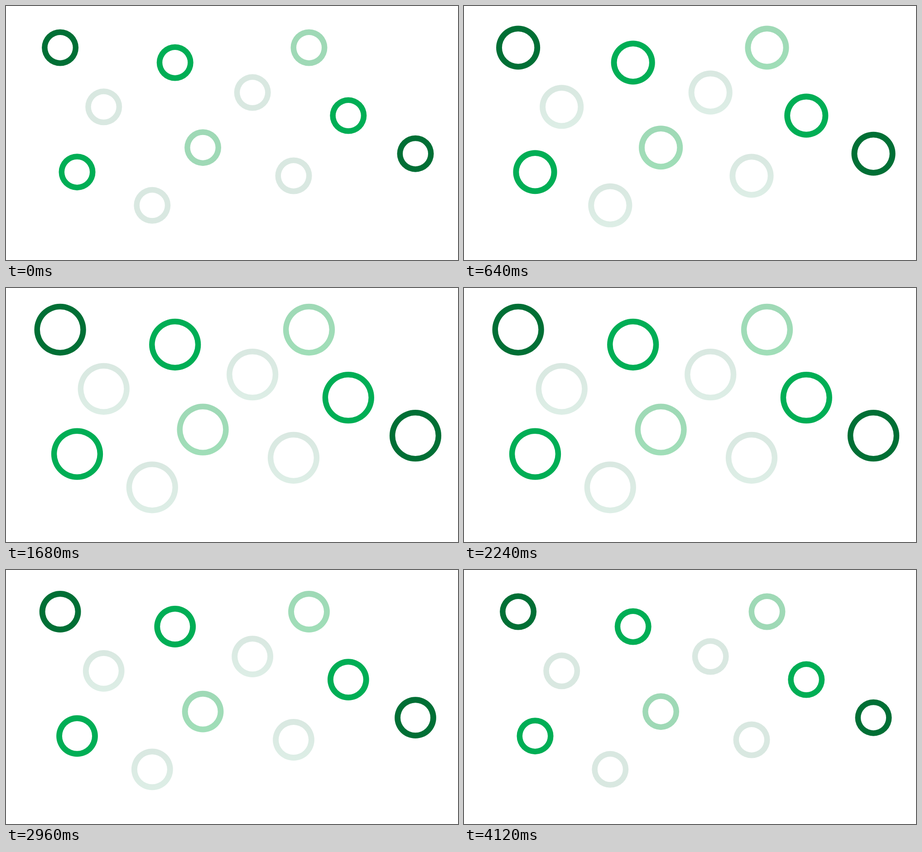
An HTML page with a canvas for the animation above (4200 ms loop, 998 px wide and 561 px high).

```html
<!DOCTYPE html>
<html lang="en">
<head>
<meta charset="utf-8">
<title>Breathing rings</title>
<style>
  html, body { margin: 0; width: 100%; height: 100%; overflow: hidden; background: #fff; }
  canvas { display: block; width: 998px; height: 561px; }
</style>
</head>
<body>
<canvas id="stage" width="998" height="561"></canvas>
<script>
const ctx = document.getElementById('stage').getContext('2d');
const LOOP = 4200, STEP = 40, MOVE = 2000;
const GROW = 40, SHRINK = 2120, FLIP = 3000;

const lerp = (a, b, p) => a + (b - a) * p;

// Each tone: resting colour and the slightly lighter shade seen while moving
const DARK = ['#006f35', '#006f35'];
const GREEN = ['#00ae55', '#00ae55'];
const MINT = ['#9fd9b6', '#a0deb8'];
const PALE = ['#d9e8e1', '#ddeee6'];

const rings = [
  [119.6, 92, DARK],
  [373.2, 125, GREEN],
  [669, 92, MINT],
  [215.7, 222.8, PALE],
  [544.2, 191.1, PALE],
  [755.8, 242.1, GREEN],
  [904, 326.2, DARK],
  [434.6, 312.7, MINT],
  [157, 366.7, GREEN],
  [322.8, 440.3, PALE],
  [635, 375, PALE]
];

// cubic-bezier(.25, 0, .25, 1), solved by bisection
function ease(u) {
  if (u <= 0) return 0;
  if (u >= 1) return 1;
  let lo = 0, hi = 1;
  for (let i = 0; i < 30; i++) {
    const s = (lo + hi) / 2;
    if (0.75 * s * (1 - s) + s * s * s < u) lo = s;
    else hi = s;
  }
  return lo * lo * (3 - 2 * lo);
}

function fillFor(y, r, [base, light], t) {
  if (t <= GROW || t >= SHRINK + MOVE) return base;
  const g = ctx.createLinearGradient(0, y - r, 0, y + r);
  const down = t < FLIP;
  g.addColorStop(0, down ? base : light);
  g.addColorStop(1, down ? light : base);
  return g;
}

function draw(t) {
  const p = ease((t - GROW) / MOVE) - ease((t - SHRINK) / MOVE);
  const r = lerp(40.5, 57.5, p);
  const inner = r * (1 - 2 * lerp(0.1543, 0.108, p));
  ctx.fillStyle = '#fff';
  ctx.fillRect(0, 0, 998, 561);
  for (const [x, y, tone] of rings) {
    ctx.fillStyle = fillFor(y, r, tone, t);
    ctx.beginPath();
    ctx.arc(x, y, r, 0, 2 * Math.PI);
    ctx.arc(x, y, inner, 0, 2 * Math.PI, true);
    ctx.fill();
  }
}

const start = performance.now();
function tick() {
  const t = (performance.now() - start) % LOOP;
  draw(Math.floor(t / STEP) * STEP);
  requestAnimationFrame(tick);
}
tick();
</script>
</body>
</html>
```
